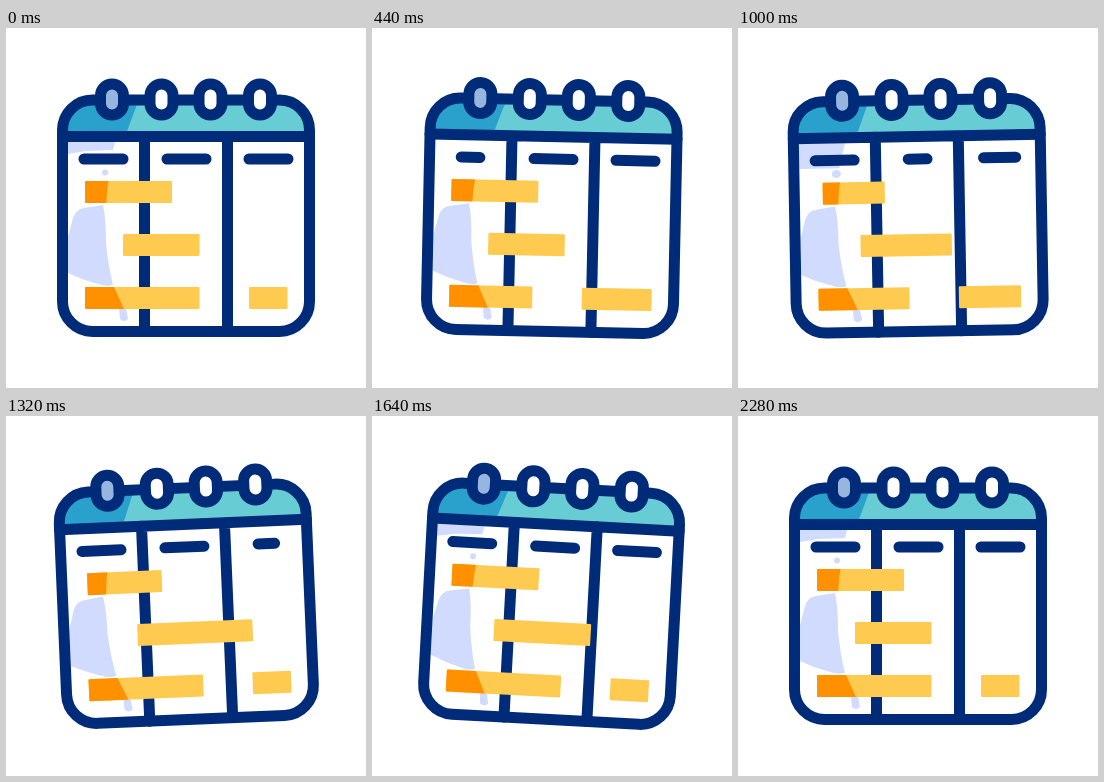
Animation of 360 by 360 pixels, one loop 2320 ms. Source, as an HTML page:

```html
<!DOCTYPE html>
<html>
<head>
<meta charset="utf-8">
<style>
  html, body { margin: 0; width: 100%; height: 100%; overflow: hidden; background: #fff; }
  svg { display: block; width: 100vw; height: 100vh; }
  .ink { fill: none; stroke: #002b78; stroke-width: 11; stroke-linecap: round; }
  .tint { fill: #d0dbfd; }
</style>
</head>
<body>
<svg viewBox="0 0 360 360">
  <defs>
    <clipPath id="shade">
      <path d="M40 60H137L120 106Q102 142 101 165Q98 195 101 222Q104 246 108 259L118 281L125 310H40Z"/>
    </clipPath>
    <path id="head" d="M56.5 108.5V102a30 30 0 0 1 30-30h187a30 30 0 0 1 30 30v6.5z"/>
    <g id="bars"></g>
  </defs>
  <g id="calendar">
    <use href="#head" fill="#67ccd3"/>
    <use href="#head" fill="#2aa0cd" clip-path="url(#shade)"/>
    <path class="tint" d="M62 245V209L67 190Q70 181 78 180L97 177Q100 190 100 215Q102 237 107 257Q100 259 92 256L76 251Z"/>
    <path class="tint" d="M113 280H120L122 291Q118 295 114 291Z"/>
    <path class="tint" id="glow"/>
    <ellipse class="tint" id="spot" cx="99" cy="144.5"/>
    <path class="ink" d="M138.500 108.500V303.500M221.500 108.500V303.500M56.500 108.500H303.500"/>
    <rect class="ink" x="56.5" y="72" width="247" height="231.500" rx="30"/>
    <g id="rings"></g>
    <g id="dashes"></g>
    <use href="#bars" fill="#ffca50"/>
    <use href="#bars" fill="#ff9100" clip-path="url(#shade)"/>
  </g>
</svg>
<script>
const LOOP = 2320;
const $ = id => document.getElementById(id);

function add(parent, tag, attrs) {
  const el = document.createElementNS('http://www.w3.org/2000/svg', tag);
  set(el, attrs);
  return $(parent).appendChild(el);
}
function set(el, attrs) {
  for (const key in attrs) el.setAttribute(key, attrs[key]);
}

const ease = u => (u = Math.min(1, Math.max(0, u)), u * u * (3 - 2 * u));
// Rises to 1 at the peak and falls back to 0 over the same half length.
const pulse = (t, peak, half) => 1 - ease(Math.abs(t - peak) / half);

// Left and right edges, how far each one travels, and when it peaks.
const bars = [
  { y: 153, left: 79, right: 166, dl: 6, dr: -19, peak: 1020 },
  { y: 206, left: 117, right: 193.5, dl: 13, dr: 52, peak: 1350 },
  { y: 259, left: 79, right: 193.5, dl: 0, dr: -50, peak: 690 },
  { y: 259, left: 243, right: 281.5, dl: -50, dr: 0, peak: 690 }
];
for (const b of bars) b.el = add('bars', 'rect', { y: b.y, height: 22, rx: 1 });

const dashes = [97.5, 180.5, 262.5].map((x, i) => ({
  x, peak: 540 + 360 * i, el: add('dashes', 'path', { class: 'ink' })
}));

[106, 155.5, 204.5, 254].forEach((x, i) => add('rings', 'rect', {
  class: 'ink', x: x - 11.5, y: 56, width: 23, height: 31, rx: 11.5,
  style: `fill:${i ? '#fff' : '#96b6e0'}`
}));

// The calendar swings between these angles, one swing every 480 ms.
const angles = [0, 3.2, -3.5, 3.2, 0];
function tilt(t) {
  const s = Math.min(3.999, Math.max(0, (t - 240) / 480)), i = Math.floor(s);
  return angles[i] + (angles[i + 1] - angles[i]) * ease(s - i);
}

function draw(now) {
  const t = now % LOOP;
  set($('calendar'), { transform: `rotate(${tilt(t)} 180 180)` });

  for (const b of bars) {
    const p = pulse(t, b.peak, 600), x = b.left + b.dl * p;
    set(b.el, { x, width: b.right + b.dr * p - x });
  }
  for (const d of dashes) {
    const half = 19.5 - 12 * pulse(t, d.peak, 400);
    set(d.el, { d: `M${d.x - half} 131H${d.x + half}` });
  }

  const wide = t > 880 && t < 1200, lit = wide || t < 240 || t > 1480;
  set($('glow'), {
    d: !lit ? '' : wide ? 'M62 114H108L102 139H62Z' : 'M62 114H109L107 122L80 123L62 126Z'
  });
  set($('spot'), { rx: wide ? 4.5 : lit ? 3 : 0, ry: wide ? 4 : lit ? 3 : 0 });
  requestAnimationFrame(draw);
}

const start = performance.now();
(function tick() {
  const frame = draw;
  draw = () => { frame(performance.now() - start); };
  draw();
})();
</script>
</body>
</html>
```
